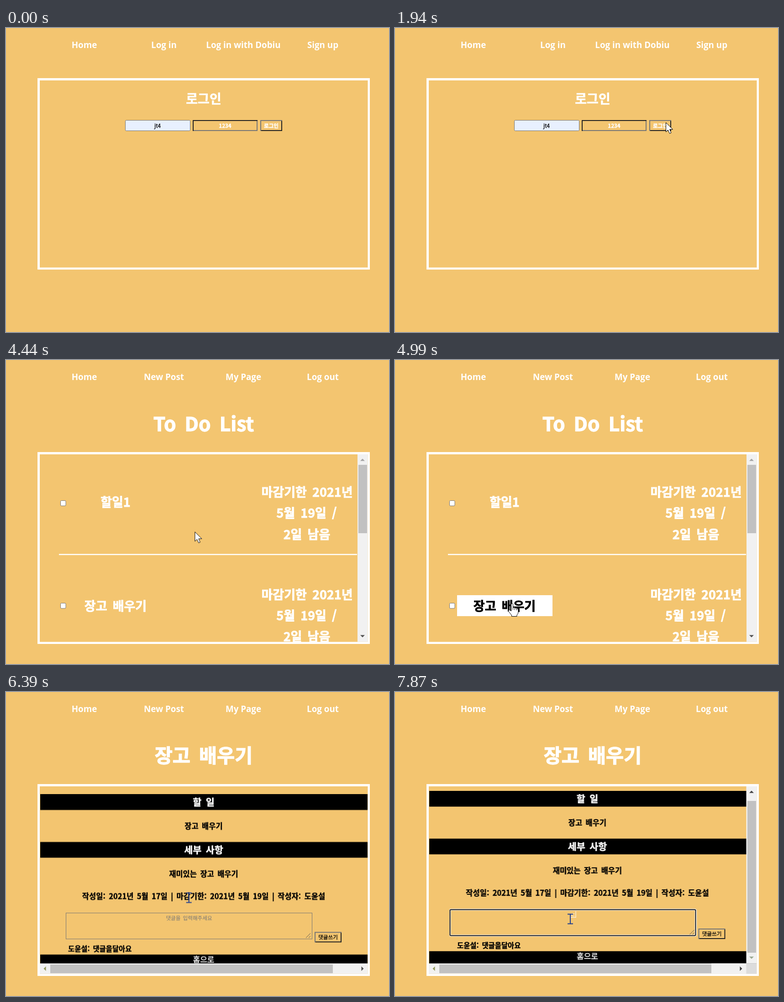
These frames come from a looping animation (839x667 px, 8000 ms). An HTML page:

```html
<!DOCTYPE html>
<html lang="ko">
<head>
<meta charset="utf-8">
<title>To Do List</title>
<style>
html, body { margin: 0; width: 100%; height: 100%; overflow: hidden; background: #f3c570; }
svg { display: block; width: 839px; height: 667px; color: #000; }
text {
  font: 700 16.5px "Noto Sans CJK KR", "Noto Sans CJK JP", sans-serif;
  text-anchor: middle; word-spacing: .17em;
  fill: currentColor; stroke: currentColor; stroke-width: .025em;
}
.white, .title, .head, .nav { color: #fff; fill: #fff; }
.nav text { font: 700 18.8px "Open Sans", "Noto Sans", sans-serif; word-spacing: 0; stroke: none; }
.title { font-size: 42.5px; stroke-width: .03em; }
.head { font-size: 20.7px; font-weight: 900; }
.row { font-size: 27px; stroke-width: .03em; }
.small { font-size: 11.6px; }
.thin { font-weight: 400; stroke: none; }
.frame { fill: #fff; fill-rule: evenodd; }
.light, .dark { fill: none; stroke-width: 2; }
.light { stroke: #767676; }
.dark { stroke: #222; }
.track { fill: #f1f1f1; }
.thumb { fill: #c1c1c1; }
.box { fill: #fff; stroke: #767676; }

[id] { animation: 8s step-end infinite; }
#login { animation-name: login; }
#press { animation-name: press; }
#member { animation-name: member; }
#list { animation-name: list; }
#hover { animation-name: hover; }
#detail { animation-name: detail; }
#scroll { animation-name: scroll; }
.shift { animation: shift 8s step-end infinite; }
#hint { animation-name: hint; }
#focus { animation-name: focus; }
#caret { animation-name: caret; }
#typed, #bars { animation-name: typed; }
#pointer { animation-name: pointer; }
#arrow { animation-name: arrow; }
#hand { animation-name: hand; }
#beam { animation-name: beam; }

@keyframes login { 41.25%, to { opacity: 0 } }
@keyframes press { 0% { opacity: 0 } 31.375% { opacity: 1 } 33.875%, to { opacity: 0 } }
@keyframes member { 0% { opacity: 0 } 41.25%, to { opacity: 1 } }
@keyframes list { 0% { opacity: 0 } 41.25% { opacity: 1 } 69.875%, to { opacity: 0 } }
@keyframes hover { 0% { opacity: 0 } 61.625%, to { opacity: 1 } }
@keyframes detail { 0% { opacity: 0 } 69.875%, to { opacity: 1 } }
@keyframes scroll {
  0%, 78.825% { transform: none; animation-timing-function: steps(3) }
  82%, to { transform: translateY(-11px) }
}
@keyframes shift { 98.375%, to { transform: translateX(-11.5px) } }
@keyframes hint { 98.375%, to { opacity: 0 } }
@keyframes focus { 0% { opacity: 0 } 89.25%, to { opacity: 1 } }
@keyframes caret { 0% { opacity: 0 } 89.25% { opacity: 1 } 95.875%, to { opacity: 0 } }
@keyframes typed { 0% { opacity: 0 } 98.375%, to { opacity: 1 } }
@keyframes arrow { 61.625%, to { opacity: 0 } }
@keyframes hand { 0% { opacity: 0 } 61.625% { opacity: 1 } 73.125%, to { opacity: 0 } }
@keyframes beam { 0% { opacity: 0 } 73.125%, to { opacity: 1 } }
@keyframes pointer {
  0% { transform: translate(769px, 700px) }
  7.5% { transform: translate(769px, 655px); animation-timing-function: steps(6) }
  12.5% { transform: translate(752px, 470px); animation-timing-function: steps(6) }
  17.5% { transform: translate(713px, 312px); animation-timing-function: steps(8) }
  24.25% { transform: translate(593px, 207px); animation-timing-function: steps(4) }
  27.75% { transform: translate(580px, 210px) }
  51.125% { transform: translate(580px, 210px); animation-timing-function: steps(6) }
  56.375% { transform: translate(380px, 410px); animation-timing-function: steps(6) }
  61.625% { transform: translate(261px, 526px) }
  62.375% { transform: translate(257px, 534px) }
  72.25% { transform: translate(257px, 534px); animation-timing-function: steps(4) }
  75.75% { transform: translate(404px, 442px) }
  78.825% { transform: translate(404px, 442px); animation-timing-function: steps(6) }
  85.125%, to { transform: translate(384px, 498px) }
}
</style>
</head>
<body>
<svg viewBox="0 0 839 667">
  <g id="login">
    <g class="nav">
      <text x="171.5" y="44">Home</text>
      <text x="346" y="44">Log in</text>
      <text x="520" y="44">Log in with Dobiu</text>
      <text x="694" y="44">Sign up</text>
    </g>
    <path class="frame" d="M69 110H797V530H69ZM74 115V525.5H792.5V115Z"/>
    <text class="head" style="font-size:28px" x="433" y="166">로그인</text>
    <rect x="261.5" y="202.5" width="142" height="23" rx="2" fill="#e8f0fe" stroke="#767676"/>
    <text class="small" style="font-weight:500" x="332" y="219">jt4</text>
    <path class="light" d="M550 203V225H409"/>
    <path class="dark" d="M410 226V203H551"/>
    <text class="small white" x="480" y="219">1234</text>
    <path class="dark" d="M604 203V225H557"/>
    <path class="light" d="M558 226V203H605"/>
    <g id="press">
      <path class="light" d="M604 203V225H557"/>
      <path class="dark" d="M558 226V203H605"/>
    </g>
    <text class="small white" x="581" y="219">로그인</text>
  </g>

  <g id="member">
    <g class="nav">
      <text x="171.5" y="44">Home</text>
      <text x="346" y="44">New Post</text>
      <text x="520" y="44">My Page</text>
      <text x="694" y="44">Log out</text>
    </g>

    <g id="list">
      <text class="title" x="433" y="155.5">To Do List</text>
      <g class="white">
        <text class="row" x="240" y="322">할일1</text>
        <text class="row" x="240" y="550">장고 배우기</text>
        <text class="row" x="659.5" y="300">마감기한 2021년</text>
        <text class="row" x="658.5" y="346">5월 19일 /</text>
        <text class="row" x="659" y="393">2일 남음</text>
        <text class="row" x="659.5" y="525">마감기한 2021년</text>
        <text class="row" x="658.5" y="571">5월 19일 /</text>
        <text class="row" x="659" y="617">2일 남음</text>
        <rect x="116" y="425.5" width="653" height="2.5"/>
      </g>
      <rect class="box" x="119.5" y="308.5" width="11.5" height="11.5" rx="2"/>
      <rect class="box" x="119.5" y="533.5" width="11.5" height="11.5" rx="2"/>
      <g id="hover">
        <rect class="white" x="136" y="516" width="209" height="46"/>
        <text class="row" x="240" y="550">장고 배우기</text>
      </g>
      <rect class="track" x="770" y="207" width="22.5" height="411.5"/>
      <rect class="thumb" x="772" y="230" width="19" height="150"/>
      <path d="M776 221.5h10l-5-5z" fill="#a3a3a3"/>
      <path d="M776 603.5h10l-5 5z" fill="#505050"/>
    </g>

    <g id="detail">
      <text class="title" x="433" y="154.5">장고 배우기</text>
      <g id="scroll">
        <rect x="75" y="228" width="717" height="34.5"/>
        <rect x="75" y="332.7" width="717" height="34.5"/>
        <rect x="75" y="579.7" width="717" height="34.5"/>
        <g class="shift">
          <text class="head" x="433" y="252.5">할 일</text>
          <text x="433" y="304">장고 배우기</text>
          <text class="head" x="433" y="357.5">세부 사항</text>
          <text x="433" y="409">재미있는 장고 배우기</text>
          <text x="433" y="458">작성일: 2021년 5월 17일 | 마감기한: 2021년 5월 19일 | 작성자: 도윤설</text>
          <text class="white" style="font-size:17px;font-weight:500" x="433" y="596.5">홈으로</text>
          <rect x="131.5" y="488.5" width="539" height="57" fill="none" stroke="#767676"/>
          <path d="M657 543l10-10M663 543l4-4" stroke="#555"/>
          <g id="focus" fill="none">
            <rect x="132" y="488.5" width="538" height="57" rx="2" stroke="#fff" stroke-width="4"/>
            <rect x="132" y="488.5" width="538" height="57" rx="2" stroke="#101010" stroke-width="2"/>
          </g>
          <text id="hint" class="small thin" style="color:#757575" x="401" y="504">댓글을 입력해주세요</text>
          <path id="caret" d="M402 492v14" stroke="#fff" stroke-width="1.3"/>
          <g id="typed">
            <text class="small white thin" x="401.5" y="504">ㄷ</text>
            <path d="M396.5 505.5h11M407.5 492v14" stroke="#fff"/>
          </g>
          <path class="dark" d="M734 531V552H676"/>
          <path class="light" d="M677 553V531H735"/>
          <text class="small" style="font-weight:500" x="705.5" y="546">댓글쓰기</text>
        </g>
        <text style="font-size:15.4px;text-anchor:start" x="136" y="573">도윤설: 댓글을달아요</text>
      </g>
      <rect class="track" x="74" y="595.5" width="718.5" height="23"/>
      <rect class="thumb" x="97" y="598" width="619" height="19"/>
      <path d="M87.5 602v10l-5-5z" fill="#92985c"/>
      <path d="M778.5 602v10l5-5z" fill="#505050"/>
      <g id="bars">
        <rect class="track" x="693" y="595.5" width="77" height="23"/>
        <path d="M755.5 602v10l5-5z" fill="#404040"/>
        <rect class="track" x="769.5" y="207" width="23" height="388.5"/>
        <rect class="thumb" x="772" y="239" width="19" height="333"/>
        <path d="M776 221.5h10l-5-5z" fill="#404040"/>
        <path d="M776 580.5h10l-5 5z" fill="#98a890"/>
        <rect x="769.5" y="595.5" width="22.5" height="23" fill="#dcdcdc"/>
      </g>
    </g>
    <path class="frame" d="M69 202H797V623H69ZM74 207V618.5H792.5V207Z"/>
  </g>

  <g id="pointer">
    <path id="arrow" d="M.5 .5V21L5 16.8 8.6 24.5 12 23 8.6 15.5H15.5Z" fill="#fff" stroke="#000"/>
    <g id="hand" stroke="#000">
      <path d="M-2.5 16V2.5Q-2.5.5-.5.5T1.5 2.5V9Q4.5 8 5.5 10 8.5 9 9.5 11.5 13 11 13 14V19Q13 23 10 25.5V28.5H-1.5V26L-8 18Q-9.5 15-7 14.5T-2.5 17Z" fill="#fff"/>
      <path d="M1.5 9v5M5.5 10v4.5M9.5 11.5v3.5" fill="none"/>
    </g>
    <path id="beam" d="M-6-10.5H6M0-10.5V10.5M-6 10.5H6" fill="none" stroke="#1d3c8f" stroke-width="2"/>
  </g>
</svg>
</body>
</html>
```
